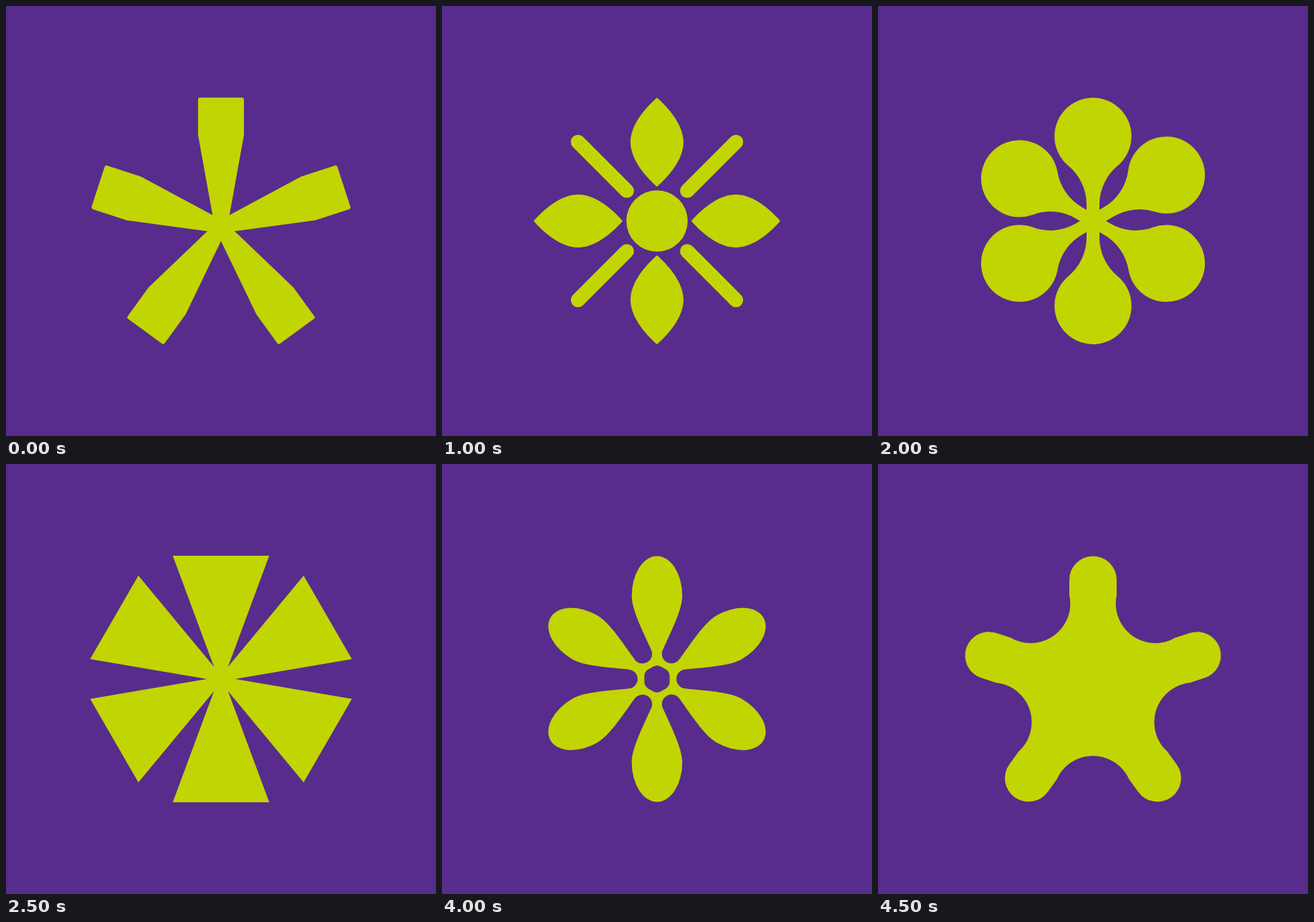
An HTML page with a canvas for the animation above (5 s loop, 600 by 600 pixels).

```html
<!DOCTYPE html>
<html lang="en">
<head>
<meta charset="utf-8">
<title>Flower shapes</title>
<style>
  html, body { margin: 0; width: 100%; height: 100%; overflow: hidden; background: #582c8c; }
  canvas { display: block; width: 100%; height: 100%; }
</style>
</head>
<body>
<canvas id="stage" width="600" height="600"></canvas>
<script>
const ctx = document.getElementById('stage').getContext('2d');
const BACK = '#582c8c', FORE = '#c1d502';
const LOOP = 5000, PI = Math.PI, rad = d => d * PI / 180;

// Repeats one arm of a path around the current origin.
function around(count, arm) {
  for (let i = 0; i < count; i++) {
    ctx.save();
    ctx.rotate(2 * PI * i / count);
    arm(i);
    ctx.restore();
  }
}

function asterisk() {
  ctx.translate(300, 308);
  around(5, () => {
    ctx.lineTo(-32, -128);
    ctx.arcTo(-32, -180.3, 0, -180.3, 3);
    ctx.arcTo(32, -180.3, 32, -128, 3);
    ctx.lineTo(32, -128);
    ctx.lineTo(11.8, -16.2);
  });
}

function blossom() {
  ctx.translate(300, 300);
  ctx.arc(0, 0, 42.8, 0, 2 * PI);
  around(4, () => {
    ctx.moveTo(0, -172);
    ctx.bezierCurveTo(0, -172, 37, -142, 37, -110);
    ctx.bezierCurveTo(37, -78, 0, -48, 0, -48);
    ctx.bezierCurveTo(0, -48, -37, -78, -37, -110);
    ctx.bezierCurveTo(-37, -142, 0, -172, 0, -172);
    ctx.closePath();
  });
  // round-ended rays on the diagonals
  around(4, () => {
    ctx.rotate(PI / 4);
    ctx.moveTo(-10, -59.6);
    ctx.arc(0, -156, 10, PI, 0);
    ctx.arc(0, -59.6, 10, 0, PI);
    ctx.closePath();
  });
}

function drops() {
  const lobe = 53.7, neck = 9, bend = 70;
  ctx.translate(300, 300);
  around(6, i => {
    // the upper right drop sits a little higher than the rest
    const x = i === 1 ? -4.33 : 0, y = i === 1 ? -120.8 : -118.3;
    const turn = side => Math.acos((neck + bend - side * x) / (lobe + bend));
    const left = turn(-1), right = turn(1);
    const drop = a => y + (lobe + bend) * Math.sin(a);
    ctx.lineTo(-neck, -15.6);
    ctx.arc(-neck - bend, drop(left), bend, 0, -left, true);
    ctx.arc(x, y, lobe, PI - left, right);
    ctx.arc(neck + bend, drop(right), bend, PI + right, PI, true);
    ctx.lineTo(neck, -15.6);
  });
}

function wedges() {
  ctx.translate(300, 300);
  around(6, () => {
    ctx.lineTo(-67.3, -172);
    ctx.lineTo(67.3, -172);
    ctx.lineTo(9.8, -17);
  });
}

function daisy() {
  ctx.translate(300, 300);
  around(6, () => {
    ctx.lineTo(-8.6, -41.8);
    ctx.bezierCurveTo(-19.4, -66, -35, -96, -35.3, -116);
    ctx.ellipse(0, -116, 35.3, 55.5, 0, PI, 2 * PI);
    ctx.bezierCurveTo(35, -96, 19.4, -66, 8.6, -41.8);
    ctx.arc(20.2, -35.1, 13.4, rad(210), rad(30), true);
  });
  ctx.closePath();
  // soft hexagonal hole, started in the middle of its upper left edge
  const r = 20.4, hx = r * Math.sin(PI / 3), hy = r / 2;
  ctx.moveTo(-hx / 2, -(r + hy) / 2);
  around(6, () => ctx.arcTo(0, -r, hx, -hy, 11));
}

function starfish() {
  ctx.translate(300, 314.5);
  around(5, () => {
    ctx.arc(0, -153, 33, PI, 0);
    ctx.arc(87, -119.7, 55.2, rad(192), rad(60), true);
  });
}

const scenes = [
  [0, asterisk], [800, blossom], [1700, drops],
  [2500, wedges], [3300, daisy], [4200, starfish]
];

function draw(t) {
  const [, shape] = scenes.filter(([start]) => t >= start).pop();
  ctx.fillStyle = BACK;
  ctx.fillRect(0, 0, 600, 600);
  ctx.save();
  ctx.beginPath();
  shape();
  ctx.closePath();
  ctx.fillStyle = FORE;
  ctx.fill('evenodd');
  ctx.restore();
}

const begin = performance.now();
function tick() {
  draw((performance.now() - begin) % LOOP);
  requestAnimationFrame(tick);
}
tick();
</script>
</body>
</html>
```
